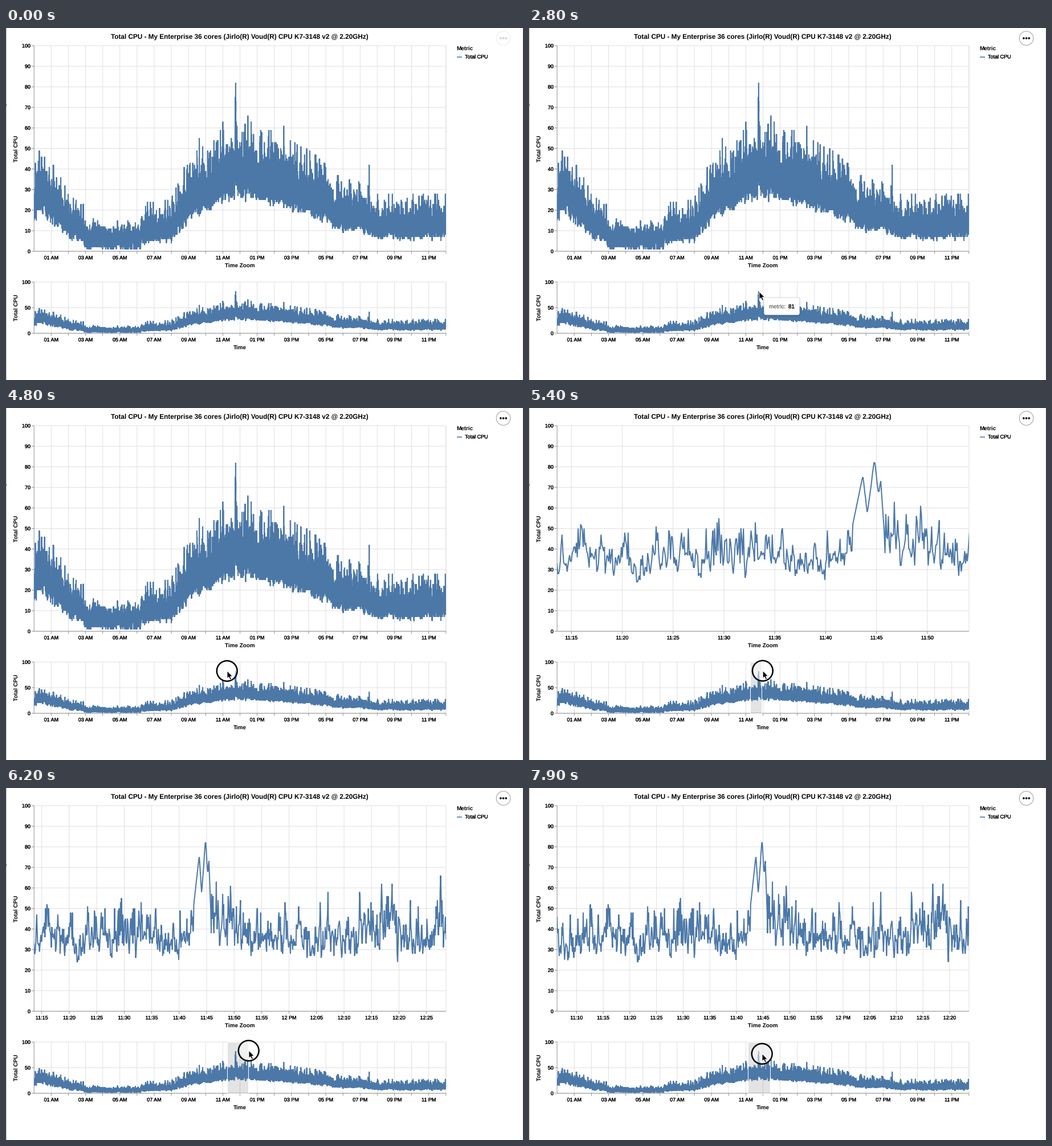
These frames come from a looping animation (907 by 618 pixels, 8000 ms). A matplotlib script:

```python
import numpy as np
import matplotlib.pyplot as plt
from matplotlib.animation import FuncAnimation
from matplotlib.collections import LineCollection
from matplotlib.patches import Circle, FancyBboxPatch, Polygon, Rectangle
from matplotlib.patheffects import withStroke

W, H, DPI = 907, 618, 64
STEP, FRAMES = 100, 80
HOUR, DAY = 3600, 86400
BLUE, GRID, AXIS = "#4c78a8", "#dddddd", "#888888"
LEFT, RIGHT = 49.2, 771.8
SPAN = RIGHT - LEFT
PT = 72 / DPI

plt.rcParams.update({"font.family": "Liberation Sans", "text.hinting": "none"})
fig = plt.figure(figsize=(W / DPI, H / DPI), dpi=DPI, facecolor="white")
ax = fig.add_axes([0, 0, 1, 1])
ax.set_xlim(0, W)
ax.set_ylim(H, 0)
ax.axis("off")


# ---- one day of CPU load, a sample every five seconds ----

def make_load():
    t = np.arange(0, DAY + 1, 5.0)
    hour = t / HOUR
    mean = np.interp(
        hour,
        [0, .4, 2, 2.9, 3, 6.2, 6.25, 8, 9, 11.5, 13, 16, 18, 19.6, 19.7, 24],
        [22, 30, 14, 10, 6, 5, 10, 12, 25, 38, 37, 28, 18, 16, 13, 13])

    # quick jitter on a slow drift, skewed upwards, spread as in a count
    rng = np.random.default_rng(5)
    quick = rng.normal(0, 0.85, t.size)
    for i in range(1, t.size):
        quick[i] += 0.5 * quick[i - 1]
    slow = np.convolve(rng.normal(size=t.size), np.hanning(60), "same")
    z = quick + 0.4 * slow / slow.std()
    z = np.clip(z + 0.12 * (z * z - 1), -2.2, 4)
    v = mean + 1.02 * np.sqrt(mean) * z

    # the burst before noon, in minutes after 11 AM
    minute = t / 60 - 660
    burst = (minute > 42.6) & (minute < 45.8)
    v[burst] = np.interp(minute[burst],
                         [42.6, 43.65, 44.1, 44.8, 45.2, 45.4, 45.8],
                         [50, 76, 57, 84, 66, 74, 46])

    # the tallest single spikes
    for h, top in [(9.63, 55), (11, 63), (12.46, 66), (12.65, 63),
                   (14.55, 61), (15.55, 51), (19.53, 42)]:
        i = int(h * HOUR / 5)
        v[i - 1:i + 2] = (v[i - 1:i + 2] + top) / 2
        v[i] = top
    return t, np.maximum(np.round(v), 1)


secs, load = make_load()


def to_sec(px):
    return (px - 49) / 723 * DAY


def ease(t, start, end):
    u = np.clip((t - start) / (end - start), 0, 1)
    return u * u * (3 - 2 * u)


# ---- drawing helpers ----

def text(x, y, s="", size=9, ha="center", bold=False, color="black", **kw):
    label = ax.text(x, y, s, fontsize=size * PT, ha=ha, color=color,
                    weight="bold" if bold else "normal", **kw)
    if not bold:
        label.set_path_effects([withStroke(linewidth=0.25 * PT, foreground=color)])
    return label


def lines(color, z, segs=(), width=0.9):
    return ax.add_collection(LineCollection(
        list(segs), colors=color, linewidths=width * PT, zorder=z, snap=False))


def tick_times(lo, hi):
    steps = [1, 5, 15, 30, 60, 300, 900, 1800, 3600, 10800]
    goal = (hi - lo) / 18
    step = min(steps, key=lambda s: abs(np.log(s / goal)))
    return np.arange(np.floor(lo / step) + 1, np.floor(hi / step) + 1) * step


def clock(s):
    s = int(s)
    h, m = s // HOUR % 24, s // 60 % 60
    if s % 60:
        return f":{s % 60:02d}"
    if m:
        return f"{(h - 1) % 12 + 1:02d}:{m:02d}"
    return f"{(h - 1) % 12 + 1:02d} {'AM' if h < 12 else 'PM'}"


class Chart:
    def __init__(self, top, base, every, title):
        self.top, self.base = top, base
        ys = [(v, self.y(v)) for v in range(0, 101, every)]
        lines(GRID, 1, [[(LEFT, y), (RIGHT, y)] for _, y in ys])
        lines(GRID, 1, [[(RIGHT, top), (RIGHT, base)]])
        lines(AXIS, 2, [[(LEFT - 4.5, y), (LEFT, y)] for _, y in ys]
              + [[(LEFT, top), (LEFT, base)], [(LEFT, base), (RIGHT, base)]])
        for v, y in ys:
            text(43, y + 3.2, str(v), ha="right")
        text(18.7, (top + base) / 2, "Total CPU", 9.9, bold=True,
             rotation=90, va="center")
        text(410.5, base + 28, title, 9.9, bold=True)
        self.grid, self.ticks = lines(GRID, 1), lines(AXIS, 2)
        self.labels = [text(0, base + 14.2) for _ in range(40)]
        self.line, = ax.plot([], [], color=BLUE, lw=2 * PT, zorder=3,
                             solid_joinstyle="bevel", solid_capstyle="butt")
        self.line.set_clip_path(Rectangle((LEFT, top), SPAN, base - top,
                                          transform=ax.transData))

    def y(self, v):
        return self.base - v * (self.base - self.top) / 100

    def show(self, lo, hi):
        """Draws the time range and returns the x of its last label."""
        def scale(s):
            return LEFT + (s - lo) / (hi - lo) * SPAN
        times = tick_times(lo, hi)
        xs = scale(times)
        self.grid.set_segments([[(x, self.top), (x, self.base)] for x in xs])
        self.ticks.set_segments(
            [[(x, self.base), (x, self.base + 4.5)] for x in xs])
        skip = 2 if xs.size > 1 and xs[1] - xs[0] < 36 else 1
        shown = list(zip(xs, times))[::skip]
        for label in self.labels:
            label.set_visible(False)
        for label, (x, s) in zip(self.labels, shown):
            label.set(x=x, text=clock(s), visible=True)
        a, b = np.searchsorted(secs, [lo, hi])
        part = slice(max(a - 2, 0), b + 2)
        self.line.set_data(scale(secs[part]), self.y(load[part]))
        return shown[-1][0] if shown else LEFT


# ---- still parts ----

lines("#b4b4b4", 1, [[(.5, 0), (.5, H)]])
lines("#e4e4e4", 1, [[(W - .5, 0), (W - .5, H)]])
lines("#555555", 1, [[(.5, 133), (.5, 137)]])
text(410, 20, "Total CPU - My Enterprise 36 cores "
     "(Jirlo(R) Voud(R) CPU K7-3148 v2 @ 2.20GHz)", 11.7, bold=True)

main = Chart(31, 392, 10, "Time Zoom")
mini = Chart(446, 536, 50, "Time")
mini.show(0, DAY)

legend = [text(790, 39, "Metric", 9.9, ha="left", bold=True),
          text(805, 53.4, "Total CPU", ha="left")]
legend_x = [a.get_position()[0] for a in legend]
key, = ax.plot([791, 800], [50.5, 50.5], color=BLUE, lw=1.6 * PT,
               solid_capstyle="butt")

# ---- moving parts ----

menu = [Circle((872.5, 18), 12.3, fc="white", ec="#a4a4a4", lw=1.1 * PT, zorder=5)]
menu += [Circle((872.5 + d, 18), 1.9, fc="#1b1e23", ec="none", zorder=6)
         for d in (-4.7, 0, 4.7)]
brush = Rectangle((0, 446), 1, 90, fc="#333333", alpha=0.135, lw=0, zorder=2.5)
edge = Rectangle((0, 446), 1, 90, fc="none", ec="white", lw=1 * PT, zorder=4)
ring = Circle((0, 0), 17.9, fc=(1, 1, 1, 0.5), ec="black", lw=2.5 * PT, zorder=10)
ARROW = np.array([(0, 0), (0, 13.4), (3, 10.7), (5.2, 15.4), (7.5, 14.4),
                  (5.4, 9.8), (9.4, 9.6)])
cursor = Polygon(ARROW, closed=True, fc="black", ec="white", lw=0.9 * PT, zorder=12)


def box(grow, **kw):
    patch = FancyBboxPatch((0, 0), 62 + 2 * grow, 30 + 2 * grow,
                           boxstyle=f"round,pad=0,rounding_size={3 + grow}", **kw)
    patch.grow = grow
    return patch


tip_boxes = [box(g, fc="black", alpha=0.03, lw=0, zorder=8) for g in (3, 2, 1)]
tip_boxes.append(box(0, fc="white", ec="#dcdcdc", lw=0.8 * PT, zorder=9))
tip_texts = [text(0, 0, "metric:", 9.8, ha="left", color="#848484", zorder=9.5),
             text(0, 0, "81", 9.8, ha="left", zorder=9.5)]
for p in [*menu, brush, edge, ring, cursor, *tip_boxes]:
    ax.add_patch(p)

# start, end, and the point the pointer moves to
MOVES = [(700, 1500, 399, 483.5), (1700, 2000, 404, 328), (2000, 2300, 404, 463),
         (2900, 3200, 404, 475), (3500, 4100, 382, 475), (4200, 4700, 388, 461.5),
         (4900, 5800, 426, 461), (6800, 7100, 417, 465.5), (7200, 7800, 409, 466.5)]


def pointer(t):
    pos = np.array([414.0, 600.0])
    for start, end, x, y in MOVES:
        pos += (np.array([x, y]) - pos) * ease(t, start, end)
    return pos


def set_tip(t, x, y):
    on = 2000 <= t < 3200
    left, top = x + 8.5, y + 10.5
    if t < 2800:  # the hint hangs back in the upper chart
        left, top = 412.5, 338.5
    for b in tip_boxes:
        b.set_visible(on)
        b.set_x(left - b.grow)
        b.set_y(top - b.grow + (1 if b.grow else 0))
    for label, dx in zip(tip_texts, (8.5, 42.5)):
        label.set(x=left + dx, y=top + 18.6, visible=on)


def draw(i):
    t = i * STEP
    x, y = pointer(t)
    cursor.set_xy(ARROW + (x, y))
    cursor.set_visible(t >= 700)
    ring.set_center((x - .3, y + .2))
    ring.set_visible(4700 <= t < 6600 or t >= 7300)
    set_tip(t, x, y)

    for p in menu:
        p.set_alpha(0.2 + 0.8 * ease(t, 1700, 2300))

    # the brushed range trails the pointer a little
    brushing = t >= 5000
    lo, hi = 0, DAY
    if brushing:
        slide = -3.64 * ease(t, 7200, 7900)
        a = 387.2 + slide
        b = 388 + 33.5 * ease(t, 4900, 5800) + 4.5 * ease(t, 6000, 6300) + slide
        lo, hi = to_sec(a), to_sec(b)
        for r in (brush, edge):
            r.set_x(a + .3)
            r.set_width(b - a)
    brush.set_visible(brushing)
    edge.set_visible(brushing)

    last = main.show(lo, hi)
    nudge = 1 if brushing and last > 760 else 0
    for label, x0 in zip(legend, legend_x):
        label.set_x(x0 + nudge)
    key.set_xdata([791 + nudge, 800 + nudge])


anim = FuncAnimation(fig, draw, frames=FRAMES, interval=STEP,
                     repeat=True, repeat_delay=0, blit=False)
plt.show()
```
